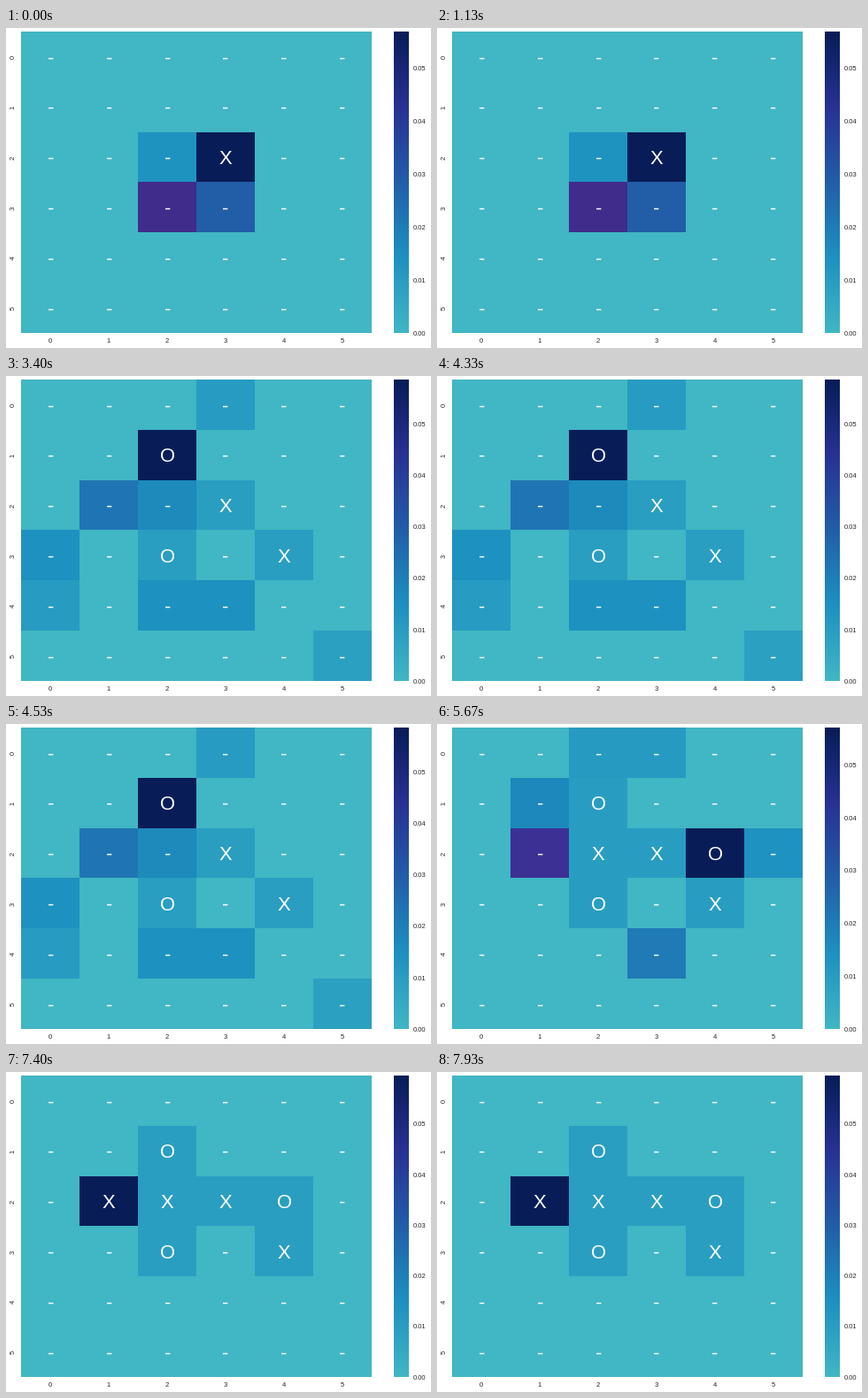
These frames come from a looping animation (480x362 px, 8000 ms). A matplotlib script:

```python
import numpy as np
import matplotlib.pyplot as plt
from matplotlib.animation import FuncAnimation
from matplotlib.colors import LinearSegmentedColormap, to_rgb

plt.rcParams["font.family"] = "Liberation Sans"

W, H, DPI = 480, 362, 100
LEFT, RIGHT, TOP, BOTTOM = 17, 412.5, 4, 345
N = 6
CELL_W, CELL_H = (RIGHT - LEFT) / N, (BOTTOM - TOP) / N
FRAMES, LOOP, HOLD = 120, 8000, 17
PLAYED = 0.0095
DARK = "#262626"

cmap = LinearSegmentedColormap.from_list(
    "sea", ["#41b6c4", "#1d91c0", "#225ea8", "#283294", "#081d58"])

# (mark, cell, top of scale, considered cells: weight or colour)
MOVES = [
    ("X", (2, 3), 0.0568, {(2, 2): 0.0135, (3, 2): "#402c8a", (3, 3): 0.0285}),
    ("O", (3, 2), 0.0584, {(1, 2): 0.0165, (1, 3): 0.0105, (4, 1): 0.0105,
                           (4, 3): 0.0295}),
    ("X", (3, 4), 0.0559, {(1, 2): "#462676"}),
    ("O", (1, 2), 0.0586, {(0, 3): 0.0105, (2, 1): 0.0225, (2, 2): 0.0165,
                           (3, 0): 0.0142, (4, 0): 0.0105, (4, 2): 0.0142,
                           (4, 3): 0.0142, (5, 5): 0.0085}),
    ("X", (2, 2), 0.0600, {}),
    ("O", (2, 4), 0.0570, {(0, 2): 0.0105, (0, 3): 0.0105, (1, 1): 0.0165,
                           (2, 1): "#3c3094", (2, 5): 0.0138, (4, 3): 0.0205}),
    ("X", (2, 1), 0.0595, {}),
    ("O", (2, 0), 0.0590, {(1, 1): 0.0105, (1, 3): 0.0105, (3, 1): 0.0105,
                           (3, 5): 0.0085, (4, 3): 0.0105, (5, 2): 0.0105,
                           (5, 5): 0.0085}),
]


def center(row, col):
    return LEFT + (col + 0.5) * CELL_W, TOP + (row + 0.5) * CELL_H


def label(x, y, text, px, color=DARK, **kw):
    return ax.text(x, y, text, fontsize=px * 72 / DPI, color=color, **kw)


fig = plt.figure(figsize=(W / DPI, H / DPI), dpi=DPI, facecolor="white")
ax = fig.add_axes([0, 0, 1, 1])
ax.axis("off")

board = ax.imshow(np.zeros((N, N, 3)), extent=(LEFT, RIGHT, BOTTOM, TOP),
                  interpolation="nearest", aspect="auto")
ax.imshow(np.linspace(1, 0, 256)[:, None], cmap=cmap, vmin=0, vmax=1,
          extent=(438, 455, BOTTOM, TOP), aspect="auto")
ax.set_xlim(0, W)
ax.set_ylim(H, 0)

marks = {}
for r in range(N):
    for c in range(N):
        x, y = center(r, c)
        marks[r, c] = label(x + 0.4, y + 7.9, "-", 22, "white",
                            ha="center", va="baseline")
for i in range(N):
    x, y = center(i, i)
    label(x, 354, str(i), 7.6, ha="center", va="center")
    label(8, y + 0.5, str(i), 7.6, ha="center", va="center", rotation=90)
ticks = [label(460, BOTTOM, f"{k / 100:.2f}", 7.6, va="center_baseline")
         for k in range(6)]


def update(frame):
    turn = frame // HOLD
    _, last, top, weights = MOVES[turn]
    played = {cell: mark for mark, cell, _, _ in MOVES[:turn + 1]}

    rgb = np.tile(cmap(0.0)[:3], (N, N, 1))
    shades = {**dict.fromkeys(played, PLAYED), **weights, last: top}
    for cell, v in shades.items():
        rgb[cell] = to_rgb(v) if isinstance(v, str) else cmap(v / top)[:3]
    board.set_data(rgb)

    for cell, text in marks.items():
        text.set_text(played.get(cell, "-"))
    for k, tick in enumerate(ticks):
        tick.set_y(BOTTOM - k / 100 / top * (BOTTOM - TOP) + 0.3)
    return [board, *marks.values(), *ticks]


anim = FuncAnimation(fig, update, frames=FRAMES, interval=LOOP / FRAMES,
                     init_func=lambda: update(0), repeat=True, repeat_delay=0)
plt.show()
```
